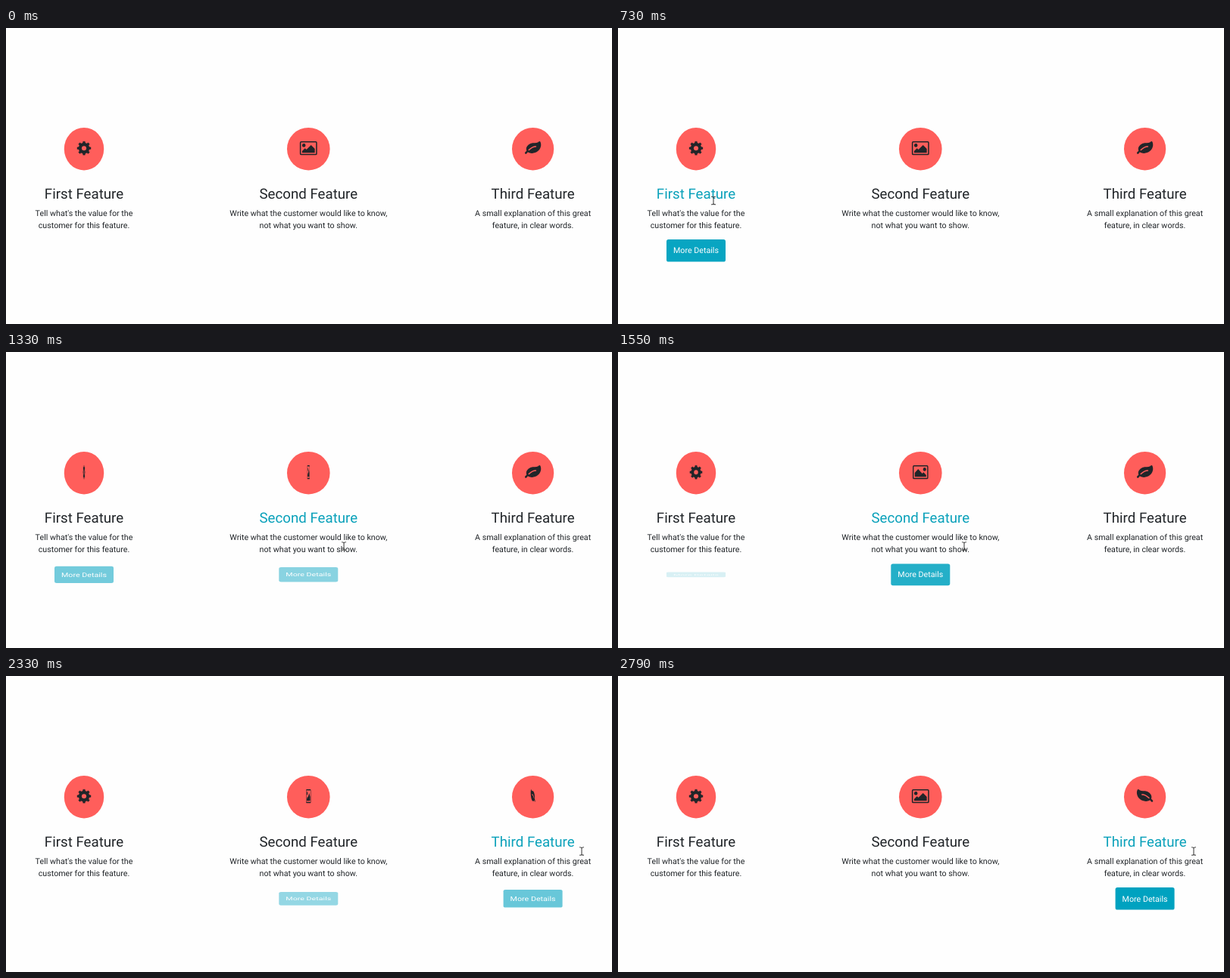
An HTML page for the animation above (3330 ms loop, 800 px wide and 392 px high).

```html
<!DOCTYPE html>
<html lang="en">
<head>
<meta charset="utf-8">
<title>Feature cards</title>
<style>
  html, body { margin: 0; width: 100%; height: 100%; overflow: hidden; background: #fefefe; }
  svg { display: block; width: 800px; height: 392px; }
  text { font-family: Roboto, sans-serif; font-size: 10.7px; text-anchor: middle; fill: #212529; text-rendering: geometricPrecision; }
  .title { font-size: 18.7px; }
  .hover .title { fill: #0aa1ba; }
  .button rect { fill: #00a2c0; }
  .button text { fill: #fff; }
  .disc, .hole { fill: #ff5e5b; }
  .icon { fill: #212529; }
  .vein { fill: none; stroke: #ff5e5b; stroke-width: 128; stroke-linecap: round; }
</style>
</head>
<body>
<svg id="stage" viewBox="0 0 800 392"></svg>
<script>
const LOOP = 3330, FPS = 15, TRANSITION = 700;
const stage = document.getElementById('stage');

// Icons are centred on the origin, in units of 1/1792 em.
function gearIcon() {
  const points = [];
  for (let tooth = 0; tooth < 8; tooth++) {
    for (const [offset, radius] of [[-.235, 600], [-.145, 768], [.145, 768], [.235, 600]]) {
      const angle = tooth * Math.PI / 4 + offset;
      points.push([radius * Math.cos(angle), radius * Math.sin(angle)].map(Math.round));
    }
  }
  return `<polygon points="${points.join(' ')}" stroke="#212529" stroke-width="24" stroke-linejoin="round"/>
    <circle class="hole" r="256"/>`;
}

const imageIcon = `
  <rect x="-896" y="-704" width="1792" height="1408" rx="96" fill="none" stroke="#212529" stroke-width="128"/>
  <circle cx="-512" cy="-320" r="192"/>
  <path d="M704 64V512H-704V320L-384 0L-224 160L288 -352Z"/>`;

const leafIcon = `<g transform="translate(-896 -896)">
  <path d="M1642 128C1740 128 1792 390 1792 506Q1792 601 1772 699C1690 1100 1310 1458 792 1458
    Q644 1458 506 1411C440 1388 370 1332 322 1332C270 1332 220 1536 125 1536
    C60 1536 40 1510 16 1459Q0 1440 0 1415C0 1310 198 1240 198 1172
    C198 1140 159 1090 159 986C159 690 400 440 696 347C900 280 1280 340 1476 226
    C1530 195 1560 128 1642 128Z"/>
  <path class="vein" d="M1216 704C900 704 710 830 448 1088"/></g>`;

const features = [
  { x: 103, rx: 26.2, icon: gearIcon(), title: 'First Feature', enter: 200, leave: 1143,
    lines: ["Tell what's the value for the", 'customer for this feature.'] },
  { x: 399.3, rx: 28.3, icon: imageIcon, title: 'Second Feature', enter: 1143, leave: 2095,
    lines: ['Write what the customer would like to know,', 'not what you want to show.'] },
  { x: 695.6, rx: 27.6, icon: leafIcon, title: 'Third Feature', enter: 2095, leave: Infinity,
    lines: ['A small explanation of this great', 'feature, in clear words.'] },
];

// Pointer stops: time, x, y
const pointerPath = [
  [200, 244, 334], [267, 205, 290], [333, 160, 250], [400, 132, 232], [467, 126, 228.5],
  [1000, 126, 228.5], [1067, 150, 231], [1133, 222, 238], [1200, 320, 247], [1267, 410, 254],
  [1333, 446, 257], [1400, 457, 257], [2000, 457, 257],
  [2067, 546, 241.5], [2133, 640, 235], [2200, 720, 232], [2267, 757, 232], [2333, 760, 232],
];

stage.innerHTML = features.map(({ x, rx, icon, title, lines }) => `
  <g class="feature" transform="translate(${x} 0)">
    <ellipse class="disc" cy="160.2" rx="${rx}" ry="28.3"/>
    <g class="icon">${icon}</g>
    <text class="title" y="226.2">${title}</text>
    ${lines.map((line, i) => `<text y="${248.6 + 16 * i}">${line}</text>`).join('')}
    <g class="button">
      <rect x="-39" y="-14.8" width="78" height="29.6" rx="2.7"/>
      <text y="3.7">More Details</text>
    </g>
  </g>`).join('') + `
  <g id="pointer" fill="none">
    <path d="M-3 -5.3Q0 -5.3 0 -4Q0 -5.3 3 -5.3M0 -4V4M-3 5.3Q0 5.3 0 4Q0 5.3 3 5.3" stroke="#444" stroke-width="1.1"/>
  </g>`;

const groups = [...stage.querySelectorAll('.feature')];
const pointer = document.getElementById('pointer');

// cubic-bezier(.25, .1, .25, 1)
function ease(progress) {
  if (progress <= 0) return 0;
  if (progress >= 1) return 1;
  const bezier = (a, b, s) => 3 * a * s * (1 - s) ** 2 + 3 * b * s * s * (1 - s) + s ** 3;
  let low = 0, high = 1;
  for (let i = 0; i < 20; i++) {
    const mid = (low + high) / 2;
    if (bezier(.25, .25, mid) < progress) low = mid; else high = mid;
  }
  return bezier(.1, 1, low);
}

function pointerAt(time) {
  const next = pointerPath.findIndex(stop => stop[0] > time);
  if (next < 0) return pointerPath.at(-1).slice(1);
  if (next === 0) return pointerPath[0].slice(1);
  const [t0, x0, y0] = pointerPath[next - 1], [t1, x1, y1] = pointerPath[next];
  const k = (time - t0) / (t1 - t0);
  return [x0 + (x1 - x0) * k, y0 + (y1 - y0) * k];
}

function draw(time) {
  features.forEach(({ enter, leave }, i) => {
    const turn = ease((time - enter) / TRANSITION) - ease((time - leave) / TRANSITION);
    const group = groups[i], button = group.querySelector('.button');
    const scale = 21.33 / 1792;
    group.classList.toggle('hover', time >= enter && time < leave);
    group.querySelector('.icon').setAttribute('transform',
      `translate(0 159.2) scale(${scale * Math.cos(Math.PI * turn)} ${scale})`);
    button.setAttribute('transform', `translate(0 294.8) scale(1 ${Math.sin(Math.PI / 2 * turn)})`);
    button.setAttribute('opacity', turn);
  });
  pointer.setAttribute('transform', `translate(${pointerAt(time)})`);
  pointer.setAttribute('visibility', time < 200 ? 'hidden' : 'visible');
}

// The picture advances in steps of 1/15 s.
function tick() {
  const step = Math.floor(performance.now() % LOOP * FPS / 1000 + .26);
  draw(Math.min(step, 49) * 1000 / FPS);
  requestAnimationFrame(tick);
}
tick();
</script>
</body>
</html>
```
